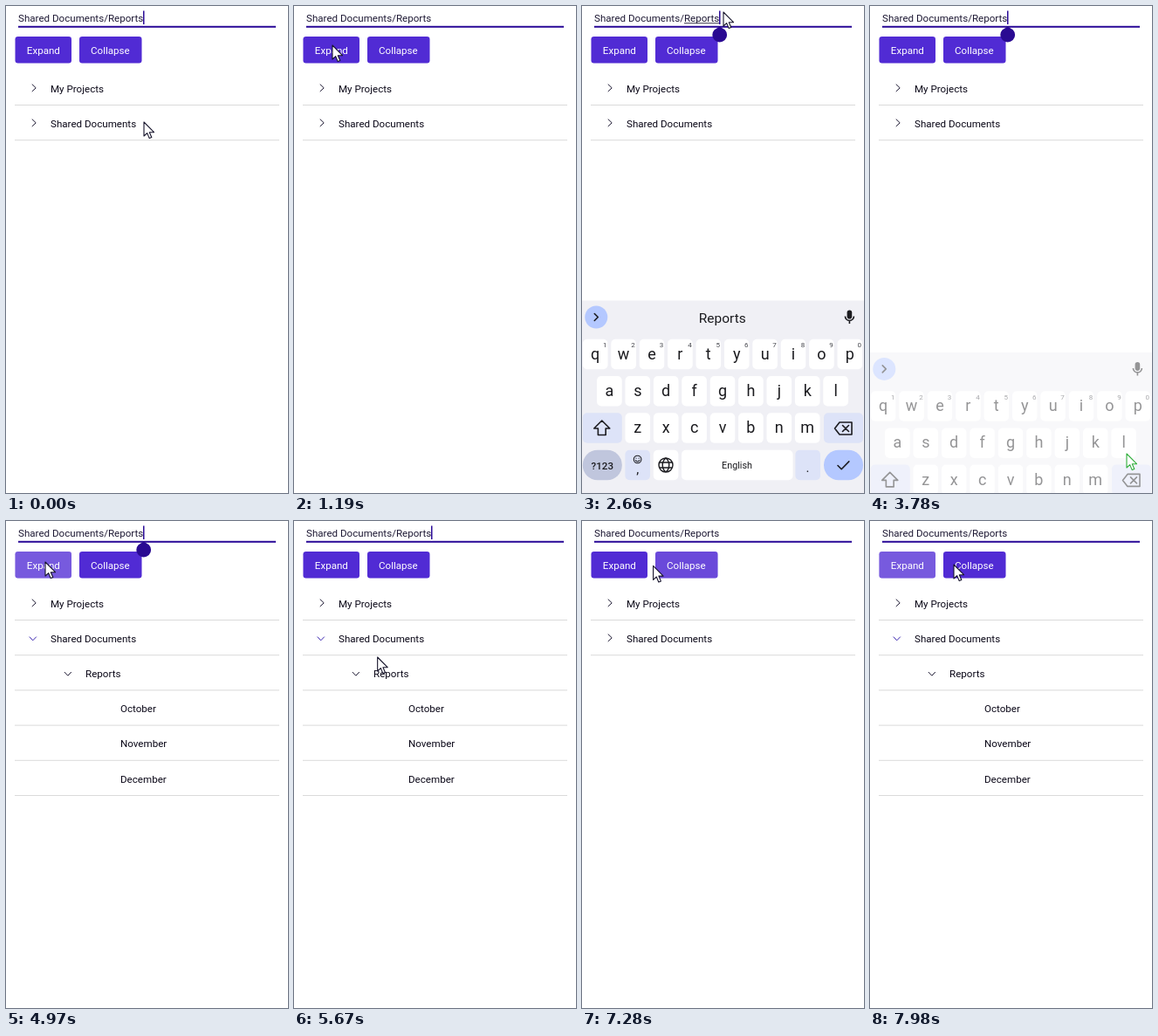
Write an HTML page that moves like this. It is 323 px wide and 558 px high and loops after 8 s.

```html
<!DOCTYPE html>
<html lang="en">
<head>
<meta charset="utf-8">
<title>Tree view path demo</title>
<style>
  html, body { margin: 0; width: 100%; height: 100%; overflow: hidden; background: #fff; }
  svg { display: block; width: 323px; height: 558px; font-family: Roboto, sans-serif; font-size: 11.6px; }
  .key { font-size: 18px; }
  .hint { font-size: 8px; fill: #44454c; }
  .icon { fill: none; stroke: #1b1b1f; stroke-width: 1.6; stroke-linejoin: round; stroke-linecap: round; }
  .chev { fill: none; stroke: #1a1630; stroke-width: 1; }
</style>
</head>
<body>
<svg id="stage" viewBox="0 0 323 558">
  <defs>
    <clipPath id="clipA"><rect x="10.5" y="35" width="64.5" height="30.5" rx="3.2"/></clipPath>
    <clipPath id="clipB"><rect x="84" y="35" width="71.5" height="30.5" rx="3.2"/></clipPath>
  </defs>
  <rect width="323" height="558" fill="#fff"/>
  <text x="14" y="18" fill="#1f1a35">Shared Documents/Reports</text>
  <rect x="14" y="22.8" width="295" height="2" fill="#2b0b98"/>
  <rect id="compose" x="117" y="19.3" width="40" height="0.9" fill="#1f1a35"/>
  <rect id="caret" x="157" y="5.5" width="1.5" height="15.5" fill="#2b0b98"/>

  <g clip-path="url(#clipA)">
    <rect x="10" y="35" width="66" height="31" fill="#512bd4"/>
    <circle id="rippleA" cx="45" cy="48" fill="#fff"/>
  </g>
  <g clip-path="url(#clipB)">
    <rect x="84" y="35" width="72" height="31" fill="#512bd4"/>
    <circle id="rippleB" cx="121" cy="52" fill="#fff"/>
  </g>
  <g fill="#fff">
    <text x="23.8" y="54.6">Expand</text>
    <text x="97" y="54.6">Collapse</text>
  </g>
  <path id="handle" fill="#2a0a92" d="M157.7 23.5L163.7 27.2A8.4 8.4 0 1 1 151.7 27.2Z"/>

  <g id="tree"></g>
  <g id="board"></g>
  <path id="cursor" d="M0 0V16L3.7 12.6L6.2 18.6L8.8 17.5L6.3 11.7H11.5Z" fill="#fff" stroke-width="1.1" stroke-linejoin="round"/>
</svg>
<script>
const LOOP = 8000, STEP = 70;
const NS = "http://www.w3.org/2000/svg";
const $ = id => document.getElementById(id);

function add(parent, tag, attrs, text) {
  const el = document.createElementNS(NS, tag);
  for (const k in attrs) el.setAttribute(k, attrs[k]);
  if (text) el.textContent = text;
  parent.appendChild(el);
  return el;
}

// Tree rows
const right = (x, y) => `M${x - 2} ${y - 4.2}l4.4 4.2l-4.4 4.2`;
const down = (x, y) => `M${x - 4} ${y - 2}l4 4.2l4 -4.2`;

function row(parent, i, x, label) {
  const y = 94.5 + i * 40.2;
  add(parent, "text", { x, y: y + 4.1, fill: "#0b0818" }, label);
  add(parent, "rect", { x: 10, y: y + 18.5, width: 303, height: 1, fill: "#dadada" });
}

const tree = $("tree");
row(tree, 0, 51, "My Projects");
row(tree, 1, 51, "Shared Documents");
add(tree, "path", { d: right(31.8, 93.8), class: "chev" });
const closed = add(tree, "path", { d: right(31.8, 133.8), class: "chev" });
const open = add(tree, "g", {});
add(open, "path", { d: down(30.8, 134.6), class: "chev", style: "stroke:#3a25b0" });
add(open, "path", { d: down(70.8, 175), class: "chev" });
row(open, 2, 91, "Reports");
["October", "November", "December"].forEach((m, i) => row(open, 3 + i, 131, m));

// Keyboard
const board = $("board");
const PITCH = 32.4, SOFT = "#dde3f8", BLUE = "#b4c8ff", INK = "#1b1b1f";

function keyBox(x, y, w, fill, rx = 5) {
  add(board, "rect", { x, y, width: w, height: 34.5, rx, fill });
}
function label(cls, x, y, text, attrs = {}) {
  add(board, "text", { class: cls, x, y, "text-anchor": "middle", fill: INK, ...attrs }, text);
}
function icon(d, attrs = {}) {
  add(board, "path", { d, class: "icon", ...attrs });
}
function letters(chars, x0, y, hints) {
  [...chars].forEach((c, i) => {
    const x = x0 + i * PITCH;
    keyBox(x - 14.3, y, 28.6, "#fff");
    label("key", x, y + 23, c);
    if (hints) label("hint", x + 11, y + 9.3, String((i + 1) % 10));
  });
}

add(board, "rect", { x: 0, y: 337.5, width: 323, height: 221, fill: "#f0f0f5" });
add(board, "circle", { cx: 16.3, cy: 356.5, r: 13, fill: BLUE });
icon("M14.3 352.5l4 4l-4 4", { "stroke-width": 1.8 });
const suggest = add(board, "text", { x: 160.7, y: 363, "text-anchor": "middle", fill: INK, style: "font-size:15.5px" }, "Reports");
add(board, "rect", { x: 303.6, y: 348.5, width: 5.6, height: 10, rx: 2.8, fill: INK });
icon("M301.4 355.5a5 5 0 0 0 10 0M306.4 361v3", { style: "stroke-linecap:butt" });

letters("qwertyuiop", 15.2, 381.8, true);
letters("asdfghjkl", 31.4, 424);
letters("zxcvbnm", 63.8, 466.2);

keyBox(0.8, 466.2, 45, SOFT);
icon("M22.8 475l-9 9h4.6v7.5h8.8v-7.5h4.6z");
keyBox(277, 466.2, 45, SOFT);
icon("M295 477h14v14h-14l-5.5 -7zM298.5 480.5l7 7m0 -7l-7 7");

keyBox(0.8, 508.8, 45, "#c0c6dd", 17);
label("", 23.3, 530.5, "?123", { "font-weight": 500 });
keyBox(49.4, 508.8, 28.6, SOFT);
add(board, "circle", { cx: 63.6, cy: 519.5, r: 4.3, class: "icon", style: "stroke-width:1.1" });
icon("M61.3 520.7q2.3 2.6 4.6 0M62 518v.2M65.2 518v.2", { style: "stroke-width:1.1" });
label("", 63.7, 535.5, ",", { style: "font-size:15px" });
keyBox(81.8, 508.8, 28.6, "#fff");
const globe = "M104 526a8 8 0 1 0 -16 0a8 8 0 1 0 16 0M96 518c-5 4 -5 12 0 16c5 -4 5 -12 0 -16M89 523h14M89 529h14";
icon(globe, { style: "stroke-width:1.4" });
keyBox(114, 508.8, 127.5, "#fff");
label("", 177.5, 530.3, "English", { style: "font-size:10.8px" });
keyBox(244.4, 508.8, 28.6, SOFT);
label("", 258.6, 534, ".", { style: "font-size:15px" });
keyBox(277, 508.8, 45, BLUE, 17);
icon("M293 526.5l4.2 4.2l8.6 -8.8");

// Motion: time, x, y, 1 = eased arrival
const PATH = [
  [0, 158, 133], [350, 34, 55, 1], [490, 41, 50], [560, 41, 50], [770, 44, 50],
  [1120, 44, 50], [1190, 44, 45], [1330, 35, 15], [1400, 35, 15], [2170, 162, 7, 1],
  [2730, 162, 7], [3500, 304, 528, 1], [3640, 304, 528], [3780, 294, 513],
  [4410, 44, 46, 1], [4480, 45, 47], [5320, 45, 47], [5390, 49, 56],
  [5810, 112, 191, 1], [5950, 112, 191], [6230, 122, 57, 1], [6440, 121, 52],
  [7000, 121, 52], [7490, 56, 51, 1], [7560, 55, 50], [7770, 55, 50], [7980, 96, 50]
];
const BLINK = [180, 690, 1190, 1690, 2150, 2520, 3080, 3500, 4100, 4620, 5090, 5530, 5960, 6400, 6900, 7400, 7900];
const clamp = v => Math.min(1, Math.max(0, v));
const between = (t, a, b) => t >= a && t < b;
const show = (el, on) => el.setAttribute("visibility", on ? "visible" : "hidden");

function cursorAt(t) {
  const i = PATH.findIndex(p => p[0] > t);
  if (i < 0) return PATH[PATH.length - 1].slice(1);
  const [t0, x0, y0] = PATH[i - 1], [t1, x1, y1, eased] = PATH[i];
  let u = (t - t0) / (t1 - t0);
  if (eased) u = u * u * (3 - 2 * u);
  return [x0 + (x1 - x0) * u, y0 + (y1 - y0) * u];
}

function ripple(el, age) {
  const on = age >= 0 && age < 770;
  el.setAttribute("r", on ? 12 + 50 * clamp(age / 200) : 0);
  el.setAttribute("fill-opacity", 0.22 * (1 - clamp((age - 450) / 300)));
}

// Share of the keyboard hidden below the stage
function hidden(t) {
  if (t < 2450 || t > 3920) return 1;
  if (t < 2660) return (1 - (t - 2420) / 240) ** 2;
  return clamp((t - 3640) / 270) ** 2;
}

function draw(t) {
  const [x, y] = cursorAt(t);
  const cur = $("cursor");
  cur.setAttribute("transform", `translate(${x} ${y})`);
  cur.setAttribute("stroke", between(t, 3640, 3850) ? "#2fae3a" : "#17152c");

  show($("caret"), BLINK.filter(b => b <= t).length % 2 === 0);
  show($("compose"), between(t, 2520, 3640));
  show(suggest, t < 3640);
  show($("handle"), between(t, 2520, 5600));

  const expanded = between(t, 4730, 6830) || t >= 7870;
  show(open, expanded);
  show(closed, !expanded);

  ripple($("rippleA"), t < 7770 ? t - 4620 : t - 7770);
  ripple($("rippleB"), t - 6720);

  const h = hidden(t);
  show(board, h < 1);
  board.setAttribute("transform", `translate(0 ${221 * h})`);
  board.setAttribute("opacity", clamp(1 - 2 * h));
}

function tick() {
  const t = performance.now() % LOOP;
  draw(Math.floor(t / STEP) * STEP);
  requestAnimationFrame(tick);
}
tick();
</script>
</body>
</html>
```
